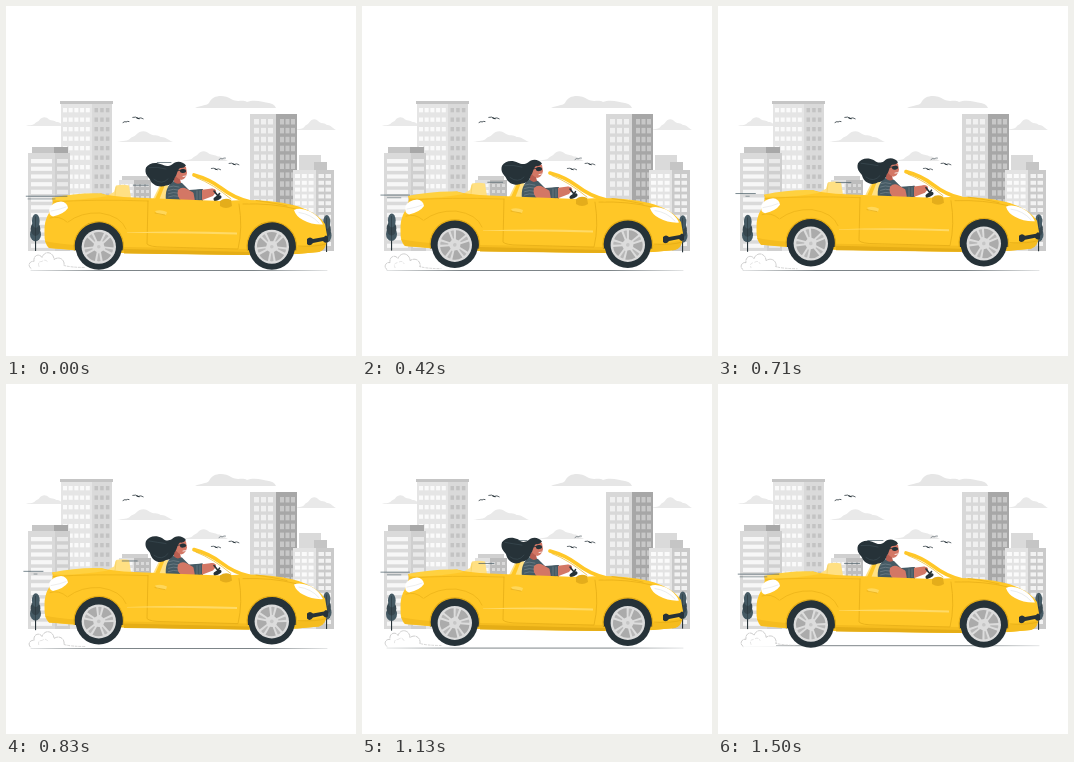
Recreate the animation shown at these times as an HTML page with a canvas. Size 350x350 px, loop 1.54 s.

```html
<!DOCTYPE html>
<html lang="en">
<head>
<meta charset="utf-8">
<title>Convertible drive</title>
<style>
html, body { margin: 0; width: 100%; height: 100%; overflow: hidden; background: #fff; }
canvas { display: block; width: 350px; height: 350px; }
</style>
</head>
<body>
<canvas id="stage"></canvas>
<script>
const LOOP = 1540, STEPS = 37, TAU = Math.PI * 2;
const DARK = '#263238', YELLOW = '#ffc727', SHADE = '#e5ad16', SKIN = '#d37765';
const canvas = document.getElementById('stage');
const ctx = canvas.getContext('2d');
const ratio = window.devicePixelRatio || 1;
canvas.width = canvas.height = 350 * ratio;

const wave = (p, phase = 0) => Math.sin(TAU * (p + phase));

function fill(d, color) {
  ctx.fillStyle = color;
  ctx.fill(new Path2D(d));
}

function line(d, color, width = 1, dash = [], offset = 0) {
  ctx.save();
  ctx.strokeStyle = color;
  ctx.lineWidth = width;
  ctx.lineCap = 'round';
  ctx.lineJoin = 'round';
  ctx.setLineDash(dash);
  ctx.lineDashOffset = offset;
  ctx.stroke(new Path2D(d));
  ctx.restore();
}

function box(x, y, w, h, color) {
  ctx.fillStyle = color;
  ctx.fillRect(x, y, w, h);
}

function oval(x, y, rx, ry, color, angle = 0) {
  ctx.fillStyle = color;
  ctx.beginPath();
  ctx.ellipse(x, y, rx, ry, angle, 0, TAU);
  ctx.fill();
}

function shifted(x, y, draw) {
  ctx.save();
  ctx.translate(x, y);
  draw();
  ctx.restore();
}

function windows(x, y, cols, rows, dx, dy, w, h, color) {
  for (let r = 0; r < rows; r++)
    for (let c = 0; c < cols; c++) box(x + c * dx, y + r * dy, w, h, color);
}

function cloud(x, y, w, h) {
  shifted(x, y, () => {
    ctx.scale(w, h);
    fill('M0 0C.1-.12.2-.08.23-.3C.26-.5.31-.45.34-.65C.42-1.1.52-1.05.59-.72C.65-.55.72-.65.78-.45C.86-.5.9-.2 1 0Z', '#e9e9e9');
  });
}

function clouds() {
  cloud(20, 120, 39, 9);
  cloud(111, 136, 56, 11);
  cloud(176, 155, 46, 10);
  cloud(289, 124, 41, 11);
  fill('M189 102C195 99 200 100 203 97C207 88 219 89 225 93C232 97 236 93 241 96C248 93 258 96 263 97C268 98 269 100 270 102Z', '#e6e6e6');
}

function buildings() {
  box(55, 97, 31, 148, '#e5e5e5');
  box(86, 97, 20, 148, '#dadada');
  box(54, 95, 53, 3, '#c5c5c5');
  windows(57, 102, 5, 14, 5.7, 9.5, 4, 4.3, '#fafafa');
  windows(88.5, 102, 3, 14, 5.7, 9.5, 3.5, 4.3, '#c3c3c3');

  box(26, 141, 23, 7, '#c6c6c6');
  box(48, 141, 14, 7, '#a8a8a8');
  box(22, 147, 27, 98, '#dadada');
  box(49, 147, 15, 98, '#cfcfcf');
  windows(25, 153, 1, 12, 0, 7.7, 21, 4.2, '#f7f7f7');
  windows(51, 153, 1, 12, 0, 7.7, 11, 4.2, '#e9e9e9');

  box(116, 170, 26, 5, '#d0d0d0');
  box(113, 174, 15, 25, '#e1e1e1');
  box(128, 174, 17, 25, '#bdbdbd');
  windows(115, 178, 3, 3, 4.3, 6, 3, 3, '#f8f8f8');
  windows(130, 178, 3, 3, 5, 6, 3, 3, '#dadada');

  box(244, 108, 27, 137, '#d8d8d8');
  box(270, 108, 21, 137, '#a7a7a7');
  windows(248, 113, 3, 12, 7, 8.9, 5, 5.5, '#f0f0f0');
  windows(274, 113, 3, 12, 5.5, 8.9, 4, 5.5, '#c8c8c8');

  box(293, 149, 22, 16, '#dadada');
  box(308, 156, 13, 9, '#c5c5c5');
  box(287, 164, 23, 81, '#e3e3e3');
  box(310, 164, 18, 81, '#cacaca');
  windows(289, 168, 3, 11, 6.8, 6.8, 5, 4, '#fafafa');
  windows(312.5, 168, 2, 11, 7, 6.8, 5.5, 4, '#f2f2f2');
}

function bird(x, y, size) {
  shifted(x, y, () => {
    ctx.scale(size, size);
    line('M-5.5-.7Q-2-1.8 .3 .4Q3-1 5.5 .8', DARK, .8);
    line('M-1.2 0L1.2 .8', DARK, 1.1);
  });
}

function birds() {
  bird(132, 112, .95);
  bird(228, 158, .9);
  bird(210, 163, .85);
  line('M117 116.5Q119.5 114.8 120 116Q121.5 115 123 115.5', DARK, .8);
  line('M213 153.5Q215.5 151.5 216 153Q218 151.5 219.5 152', '#59646a', .7);
}

function tree(x, y, w) {
  shifted(x, y, () => {
    box(-.5, -18, 1.1, 19, DARK);
    oval(0, -15.5, w, 7, '#455a64');
    oval(0, -21, w * .88, 7, '#37474f');
    oval(.3, -29, w * .7, 7, '#455a64');
    line('M0-33V-8', DARK, .5);
  });
}

function ground(p) {
  const rise = Math.min(1, Math.max(0, (p - .7) / .2));
  const y = 264.5 - 2.8 * rise;
  const ink = ctx.createLinearGradient(24, 0, 322, 0);
  ink.addColorStop(0, '#26323833');
  ink.addColorStop(.25, DARK);
  ink.addColorStop(.75, DARK);
  ink.addColorStop(1, '#26323833');
  line(`M25 ${y}H321`, ink, .6);
}

function smoke(p) {
  shifted(0, .8 * wave(p, -.12), () => {
    const puff = 'M25 263C21 260 24 255 28 256C27 249 34 248 36 252C39 244 48 247 48 254C54 250 59 255 58 260';
    fill(puff + 'L58 263Z', '#fff');
    line(puff, '#bdbdbd', .75, [4, 1.2], -p * 52);
    line('M33 261Q31 256 36 256Q40 253 42 257', '#d4d4d4', .6, [3, 2], -p * 50);
    line('M58 260Q65 262 79 262', '#c5c5c5', .7, [2, 1.7], -p * 37);
  });
}

function speedLines(p) {
  const slide = 3 * wave(p, .25);
  const y = 188.8 + 1.5 * wave(p, .2);
  line(`M${19 + slide * .4} ${y}H${49 + slide * 4}`, '#455a64', .7);
  line(`M${25 - slide} ${y + 2.7}H${40 + slide * 3}`, '#69777d', .7);
  const reach = 136 + 7 * wave(p, .14);
  line(`M${reach - 14} ${178 + 2 * wave(p, .4)}h15`, '#455a64', .7);
  const gust = 17 * Math.max(0, wave(p, .35));
  if (gust) line(`M${165 - gust} 156.5h${gust}`, '#455a64', .7);
}

function wheel(x, y, turn) {
  oval(x, y, 23.2, 23, DARK);
  oval(x, y, 17.2, 17, '#dcdcdc');
  shifted(x, y, () => {
    ctx.rotate(turn);
    for (let i = 0; i < 5; i++) {
      fill('M-1.4-5.5L-5.2-13.8Q0-16 5.2-13.8L1.4-5.5Z', '#ababab');
      ctx.rotate(TAU / 10);
      fill('M-.5-6.5L-1.7-14.3Q0-15 1.7-14.3L.5-6.5Z', '#b8b8b8');
      ctx.rotate(TAU / 10);
    }
    oval(0, 0, 1.8, 1.8, '#c6c6c6');
  });
}

function driver(p) {
  const sway = wave(p, .12) * .9;
  fill('M160 195C159 186 161 179 168 175L176 177L183 184L197 183V195Z', '#455a64');
  fill('M168 171L173 169L175 177Q171 179 168 176Z', '#b85e51');
  fill('M170 161Q175 157 180 161L181 167Q180 173 175 174Q169 171 168 166Z', SKIN);
  fill(`M180 159.5C176 154 169 155 166 158.5C162 161 159 160 156 ${158 + sway}
    C150 ${155 + sway} 143 ${156 + sway} 140 ${161 + sway}C138 ${167 + sway} 142 ${170 + sway} 144 ${173 + sway}
    C146 ${180 - sway} 154 ${183 - sway} 160 179.5C165 179 168 176 168.5 172C171 170 171 164 174 162Q178 162.5 180 159.5Z`, DARK);
  line(`M143 ${161 + sway}Q151 ${161 - sway} 160 163M148 ${174 - sway}Q156 ${180 - sway} 162 173`, '#43545c', .5);
  oval(177, 165, 3.1, 2, DARK, -.12);
  line('M169 165L177 164', DARK, .8);
  line('M177 170.5L179.5 170', '#fff', .8);
  for (let i = 0; i < 4; i++) line(`M162.5 ${181 + i * 3.3}Q167 ${179 + i * 3.3} 173 ${181 + i * 3.1}`, '#829096', .55);
  fill('M194 184L206 182.5Q210 183 210 186L207 190L194 195Z', SKIN);
  fill('M172 184Q176 180 181 183L188 187L191 191L188 195H176Q170 191 172 184Z', SKIN);
  fill('M187 184.5L196 183V194L189 195Z', '#455a64');
  line('M191 185V194M194 185V193', '#829096', .5);
  oval(206.5, 185.5, 3.5, 2.8, SKIN);
  line('M208 185L212 190M213.5 187.5L208 196', DARK, 1.6);
  oval(211.5, 192, 4.3, 2.1, DARK, -.45);
}

function body() {
  fill('M46 192Q69 190 95 187.5Q106 190.5 128 191.5L151 192.5L215 195L238 194Q266 194 287 199Q310 205 319 218L321 229Q322 241 313 246L291 248L243 249L119 247L65 244L43 242Q38 238 38.5 226Q38 215 43 207L47 196Z', YELLOW);
  fill('M46 192Q72 186.5 95 187.5L102 190Q74 195 48 194Z', '#ffd13f');
  fill('M39 235Q60 240 119 241L243 243Q286 244 320 236Q320 244 313 246L291 248L243 249L119 247L43 242Z', '#f5bc1f');
  fill('M118 243L243 246V249L118 247.5Z', SHADE);
  line('M47 196Q87 193 142 195M44 212Q53 209 61 216M62 216Q75 206 94 207Q115 210 120 223', '#edb41a', .8);
  line('M142 195L141 238Q144 241 157 241L232 243Q237 222 233 198', SHADE, .75);
  fill('M121 226.5Q172 224.5 231 226.5V228.5Q172 226.5 121 227Z', '#ffda66');
  line('M237 198Q266 197 290 203M250 194.5Q269 197 281 200', SHADE, .7);
  fill('M149 205Q155 203 161 206L160 209L151 208Z', '#ffd759');
  line('M149 207L159 209', SHADE, .7);
  fill('M43.5 202Q46 196.5 55 195.5Q61 196 62 202Q58 208 47 210.5Q42 209.5 43.5 202Z', '#fff');
  line('M45 205Q54 203.5 60 201', '#eeeeee', 1);
  fill('M288 204Q294 201 304 205.5Q313 210 317 218.5Q306 219 297 214Q290 210.5 288 204Z', '#fff');
  line('M293 206.5Q305 208 313 217', '#e4e8e9', .8);
  fill('M301 233Q304 230 307 233L318 231Q320 228 322 231V236Q319 238 317 235L307 237Q304 241 301 238Z', DARK);
  line('M292 240Q311 241 320 238', SHADE, .8);
}

function car(p) {
  fill('M100 191Q103 188 108 186L110 179.5Q117 178 123 179.5L125 192Z', '#ffe083');
  line('M110 181L109 190', '#f5cf5b', .7);
  fill('M147 193L154 179Q158 177 163 180L161 194Z', '#ffe083');
  fill('M149 193L155 180L158.5 180L153.5 193Z', YELLOW);
  fill('M190 171Q209 174 237 194L213 196L209 187Z', '#fff');
  driver(p);
  body();
  line('M188 169Q203 173 215 182Q228 192 243 195.5', YELLOW, 3.7);
  line('M190 171.5Q207 178 225 193', '#e9b51c', .7);
  fill('M214 195Q219 191 225 194L226 200Q220 204 214 200Z', '#e4ad1b');
  for (const x of [92.8, 265.8]) {
    ctx.lineWidth = 1.2;
    ctx.strokeStyle = SHADE;
    ctx.fillStyle = DARK;
    ctx.beginPath();
    ctx.arc(x, 240.5, 24.7, Math.PI * .95, Math.PI * 2.05);
    ctx.fill();
    ctx.stroke();
    wheel(x, 240.8, p * TAU);
  }
}

function draw(p) {
  ctx.setTransform(ratio, 0, 0, ratio, 0, 0);
  box(0, 0, 350, 350, '#fff');
  clouds();
  buildings();
  birds();
  const sway = wave(p, .08);
  tree(29.5, 244.5 - 1.2 * sway, 5.5);
  ground(p);
  smoke(p);
  tree(320.5, 244.5 + sway, 5);
  shifted(0, -1.7 * (1 - Math.cos(TAU * p)), () => car(p));
  speedLines(p);
}

const start = performance.now();
function tick() {
  const phase = ((performance.now() - start) % LOOP) / LOOP;
  draw(Math.floor(phase * STEPS) / STEPS);
  requestAnimationFrame(tick);
}
tick();
</script>
</body>
</html>
```
